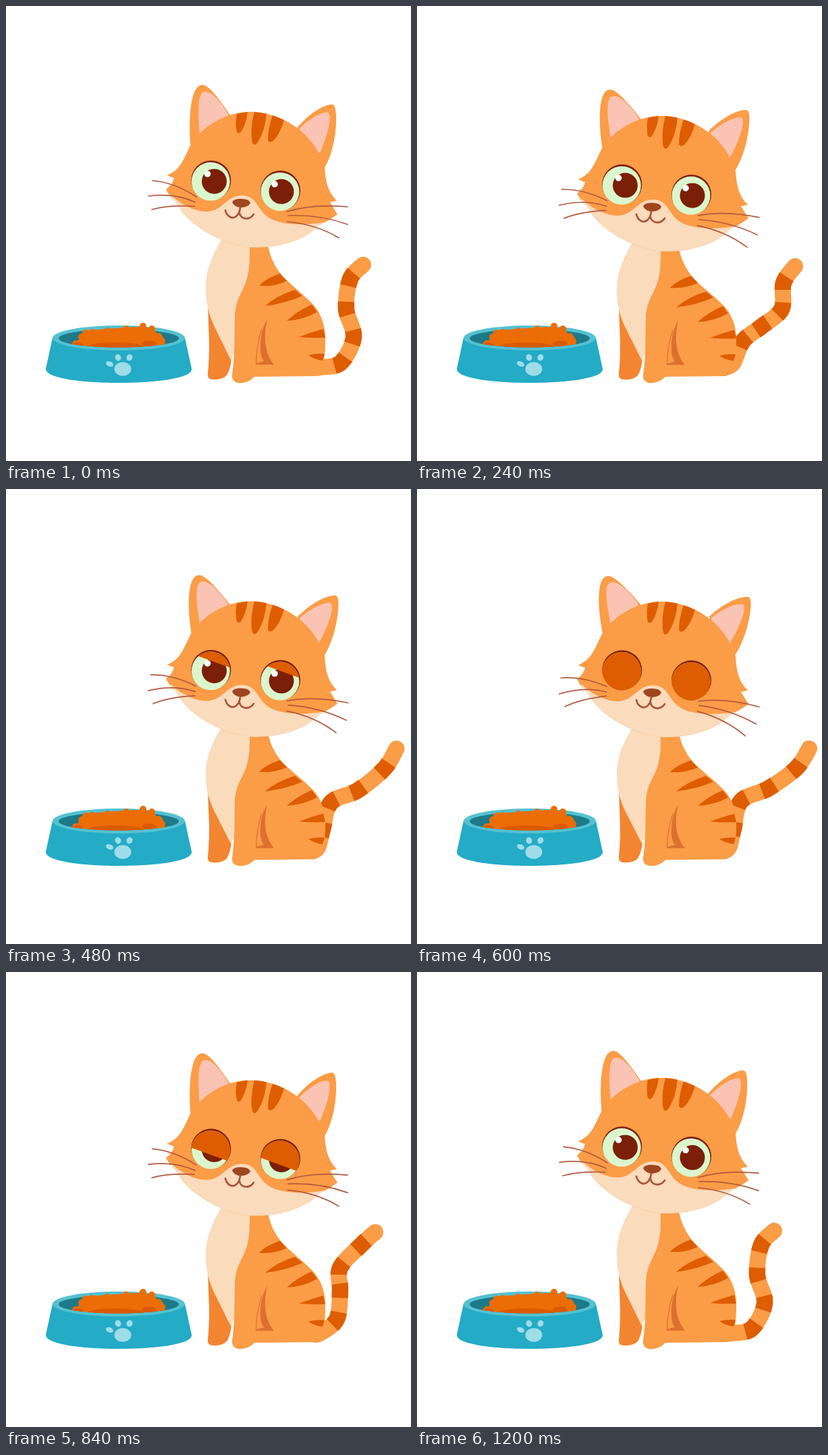
An HTML page with a canvas that plays this animation: 600 by 675 pixels, repeating every 1240 ms.

```html
<!DOCTYPE html>
<html lang="en">
<head>
<meta charset="utf-8">
<title>Cat and bowl</title>
<style>
  html, body { margin: 0; width: 100%; height: 100%; overflow: hidden; background: #fff; }
  canvas { display: block; width: 600px; height: 675px; }
</style>
</head>
<body>
<canvas id="stage" width="600" height="675"></canvas>
<script>
const ctx = document.getElementById('stage').getContext('2d');
const LOOP = 1240, STEP = 40;
const ORANGE = '#fb9c46', STRIPE = '#de5d00', CREAM = '#fadbbb', PINK = '#fbc3b3',
      DARK = '#7c1f08', GREEN = '#daf6cc', LINE = '#b2593f';

const path = d => new Path2D(d);
const fill = (shape, color) => { ctx.fillStyle = color; ctx.fill(shape); };
const stroke = (shape, color, width) => {
  ctx.strokeStyle = color;
  ctx.lineWidth = width;
  ctx.stroke(shape);
};
const oval = (x, y, rx, ry, color, rot = 0) => {
  ctx.beginPath();
  ctx.ellipse(x, y, rx, ry, rot, 0, Math.PI * 2);
  ctx.fillStyle = color;
  ctx.fill();
};
const disc = (x, y, r, color) => oval(x, y, r, r, color);
const layer = draw => { ctx.save(); draw(); ctx.restore(); };
const turned = (x, y, angle, draw) => layer(() => {
  ctx.translate(x, y);
  ctx.rotate(angle);
  ctx.translate(-x, -y);
  draw();
});
const clamp = u => Math.max(0, Math.min(1, u));
const easeOut = u => 1 - (1 - u) ** 2;

// Timing
function sway(t) {
  if (t < 600) return Math.sin(t / 600 * Math.PI / 2);
  return (1 - clamp((t - 600) / 600)) ** 2.12;
}

const TWITCH = [0, 200, 400, 600, 840, 1000, 1240];
function twitch(t) {
  const i = TWITCH.findIndex((a, n) => t >= a && t < TWITCH[n + 1]);
  const e = easeOut((t - TWITCH[i]) / (TWITCH[i + 1] - TWITCH[i]));
  return i % 2 ? 1 - e : e;
}

function lidCover(t) {
  if (t <= 600) return clamp((t - 440) / 160);
  return 1 - clamp((t - 640) / 320) ** 2;
}

// Tail: centre points from tip to root at a few key poses
const POSES = [
  [0,    529,384, 510,405, 504,449, 515,491, 496,529, 466,536],
  [240,  560,386, 543,411, 540,450, 511,475, 483,497, 468,530],
  [400,  574,386, 558,416, 522,452, 484,469, 469,507, 462,532],
  [600,  581,385, 562,414, 521,444, 480,463, 469,504, 462,532],
  [840,  547,386, 526,405, 495,439, 495,473, 490,515, 465,536],
  [1000, 535,385, 513,403, 499,436, 510,479, 495,524, 466,536]
];

function tailPoints(t) {
  let i = POSES.length - 1;
  while (POSES[i][0] > t) i--;
  const a = POSES[i], b = POSES[(i + 1) % POSES.length];
  const from = sway(a[0]), to = sway(b[0]);
  const u = (sway(t) - from) / (to - from);
  const pts = [];
  for (let n = 1; n < a.length; n += 2) {
    pts.push([a[n] + (b[n] - a[n]) * u, a[n + 1] + (b[n + 1] - a[n + 1]) * u]);
  }
  pts.push([452, 537]);
  return pts;
}

function spline(pts, per) {
  const out = [];
  for (let i = 0; i < pts.length - 1; i++) {
    const p0 = pts[Math.max(0, i - 1)], p1 = pts[i], p2 = pts[i + 1];
    const p3 = pts[Math.min(pts.length - 1, i + 2)];
    for (let n = 0; n < per; n++) {
      const u = n / per;
      out.push([0, 1].map(k => 0.5 * (2 * p1[k] + (p2[k] - p0[k]) * u
        + (2 * p0[k] - 5 * p1[k] + 4 * p2[k] - p3[k]) * u * u
        + (3 * p1[k] - p0[k] - 3 * p2[k] + p3[k]) * u ** 3)));
    }
  }
  return out;
}

function polyline(pts) {
  const p = new Path2D();
  pts.forEach(q => p.lineTo(q[0], q[1]));
  return p;
}

function drawTail(t) {
  const PER = 40;
  const line = spline(tailPoints(t), PER);
  const len = [0];
  for (let i = 1; i < line.length; i++) {
    len[i] = len[i - 1] + Math.hypot(line[i][0] - line[i - 1][0], line[i][1] - line[i - 1][1]);
  }
  ctx.lineJoin = 'round';
  ctx.lineCap = 'round';
  stroke(polyline(line), ORANGE, 24);
  ctx.lineCap = 'butt';
  for (let band = 1; band <= 4; band++) {
    const mid = len[band * PER];
    stroke(polyline(line.filter((p, i) => Math.abs(len[i] - mid) < 11)), STRIPE, 24.4);
  }
}

// Body
const farLeg = path('M299 445L301 500Q301 525 299 545Q298 554 306 554Q320 555 327 548Q333 538 334 522L325 480Z');
const chest = path('M326 335C308 365 296 388 296 418C296 442 300 456 308 474L333 525L345 500L365 420L366 340Z');
const torso = path('M361 340L386 340C388 368 398 387 411 402C428 419 441 428 455 443C468 457 474 478 473 498Q473 513 471 525Q468 545 458 549L368 550Q360 559 346 559.5Q334 558 335 547C340 515 338 480 339 462C341 420 361 425 361 368Z');
const legShade = path('M387 465C378 480 376 497 377 512Q378 522 382 527L370 530V532H397C383 515 381 490 387 465Z');
const legLine = path('M379 479Q371 503 370.5 531');
const bodyStripes = path('M375 415Q385 404 406 397L416 408Q396 417 375 415Z'
  + 'M384 445Q400 430 428 421L439 430Q415 441 384 445Z'
  + 'M416 467Q432 452 453 443L461 454Q440 466 416 467Z'
  + 'M434 491Q452 484 470 479L473 492Q455 493 434 491Z'
  + 'M448 518Q460 515 472 516L469 526Q456 524 448 518Z');

// The body squashes a little towards the feet as the head sinks
function drawBody(t) {
  const FLOOR = 555;
  ctx.translate(0, FLOOR);
  ctx.scale(1, 1 - 0.035 * sway(t));
  ctx.translate(0, -FLOOR);
  fill(farLeg, '#f38531');
  fill(chest, CREAM);
  fill(torso, ORANGE);
  fill(bodyStripes, STRIPE);
  fill(legShade, '#dc7030');
  stroke(legLine, '#dc7030', 1.2);
}

// Head
const earL = path('M274 211C270 180 271 117 291 117C301 117 318 141 334 165L320 205Z');
const earLIn = path('M287 194C284 160 283 127 295 127C308 127 322 148 331 164L305 205Z');
const earR = path('M430 182C446 162 471 145 484 146C492 149 489 185 486 200Q481 225 472 240L440 222Z');
const earRIn = path('M433 184C448 168 468 156 477 158C483 163 479 185 465 218L445 220Z');
const skull = path('M273 207C285 185 320 157 362 157C405 157 455 185 472 238C473 258 476 275 490 289L480 291L491 309Q479 318 464 325C445 346 405 360 362 358C320 354 268 325 252 291Q243 284 237 272Q247 265 249 255Q244 254 239 251C258 243 262 230 273 207Z');
const muzzle = path('M244 280Q270 304 297 305C320 305 326 282 349 281C372 281 372 302 388 313C405 325 440 326 470 321V370H240Z');
const headStripes = path('M342 160L358 157Q356 175 348 187Q345 190 342 187Q339 175 342 160Z'
  + 'M368 157L386 159Q384 185 373 202Q368 209 365 203Q361 185 368 157Z'
  + 'M395 162L412 169Q406 190 396 200Q390 204 388 199Q388 182 395 162Z');
const nose = path('M335 291Q337 286 348 286Q360 286 362 292Q360 298 348 299Q338 298 335 291Z');
const mouth = path('M325 303C327 312 335 317 341 312Q346 308 347 299M346 307C347 316 360 319 367 309');
const whiskersL = path('M217 259Q250 262 282 283M211 282Q250 277 280 291M216 302Q240 295 279 297');
const whiskersR = path('M416 305Q455 293 506 298M418 311Q465 309 506 324M417 320Q460 324 493 344');

function drawEye(x, y, pupil, cover) {
  disc(x, y, 29.5, DARK);
  const gx = x - 0.5, gy = y + 1.6;
  disc(gx, gy, 28.5, GREEN);
  disc(pupil, y + 1.5, 18.5, DARK);
  disc(pupil - 10, y - 9.5, 4.8, '#fff');
  if (cover <= 0) return;
  layer(() => {
    ctx.beginPath();
    ctx.arc(gx, gy, 28.6, 0, Math.PI * 2);
    ctx.clip();
    ctx.translate(gx, gy);
    ctx.rotate(0.35);
    ctx.fillStyle = STRIPE;
    ctx.fillRect(-32, -32, 64, 3 + 59 * cover);
  });
}

function drawHead(t) {
  const w = twitch(t), cover = lidCover(t);
  turned(302, 185, -0.13 * w, () => { fill(earL, ORANGE); fill(earLIn, PINK); });
  turned(455, 205, 0.13 * w, () => { fill(earR, ORANGE); fill(earRIn, PINK); });
  fill(skull, ORANGE);
  layer(() => {
    ctx.clip(skull);
    fill(muzzle, CREAM);
    fill(headStripes, STRIPE);
  });
  drawEye(303.8, 258.7, 308.5, cover);
  drawEye(406.5, 273.8, 408, cover);
  fill(nose, '#a0461f');
  ctx.lineCap = ctx.lineJoin = 'round';
  stroke(mouth, '#aa543b', 2.7);
  turned(281, 288, -0.17 * w, () => stroke(whiskersL, LINE, 1.7));
  turned(417, 311, 0.17 * w, () => stroke(whiskersR, LINE, 1.7));
}

// Bowl
const bowlSide = path('M69 492L59 538C58 552 110 559 167 559S277 552 275 538L265 492Z');
const foodArea = path('M60 460H280V493H256A89 13.5 0 0 1 78 493H60Z');
const food = path('M96 503Q99 496 107 496L111 486L121 481L150 479L175 477L198 476L220 479L224 488L232 489L236 502L200 515H130Z');
const lumps = [[103,500,4], [112,491,5], [118,485,5], [127,483,4], [138,484,4], [150,481,4],
  [161,482,4], [178,478,4], [190,480,4], [203,475,5], [216,479,5], [226,490,5], [231,497,5]];

function drawBowl() {
  fill(bowlSide, '#24abc6');
  oval(167, 492.5, 98, 18.5, '#54c1d1');
  oval(167, 493, 89, 13.5, '#1c7a89');
  layer(() => {
    ctx.clip(foodArea);
    fill(food, '#ec6d05');
    lumps.forEach(([x, y, r]) => disc(x, y, r, '#ec6d05'));
    oval(162, 506, 42, 7, '#d95a03');
    oval(212, 501, 11, 4.5, '#d95a03');
    oval(106, 503, 9, 4, '#d95a03');
  });
  const PAW = '#9edce8';
  oval(173, 538.5, 12.5, 10.3, PAW);
  oval(153.5, 531, 5.8, 3.7, PAW, 0.4);
  oval(166, 521.5, 4.4, 5, PAW, -0.3);
  oval(183, 521.3, 4.4, 5, PAW, 0.5);
}

function render(t) {
  ctx.fillStyle = '#fff';
  ctx.fillRect(0, 0, 600, 675);
  drawBowl();
  drawTail(t);
  layer(() => drawBody(t));
  layer(() => {
    ctx.translate(0, 10 * sway(t));
    drawHead(t);
  });
}

// Steps of 40 ms, with two poses held for a double step
function stepTime(ms) {
  const t = Math.floor((ms % LOOP) / STEP) * STEP;
  return t === 40 || t === 1040 ? t - STEP : t;
}

const start = performance.now();
function tick() {
  render(stepTime(performance.now() - start));
  requestAnimationFrame(tick);
}
tick();
</script>
</body>
</html>
```
